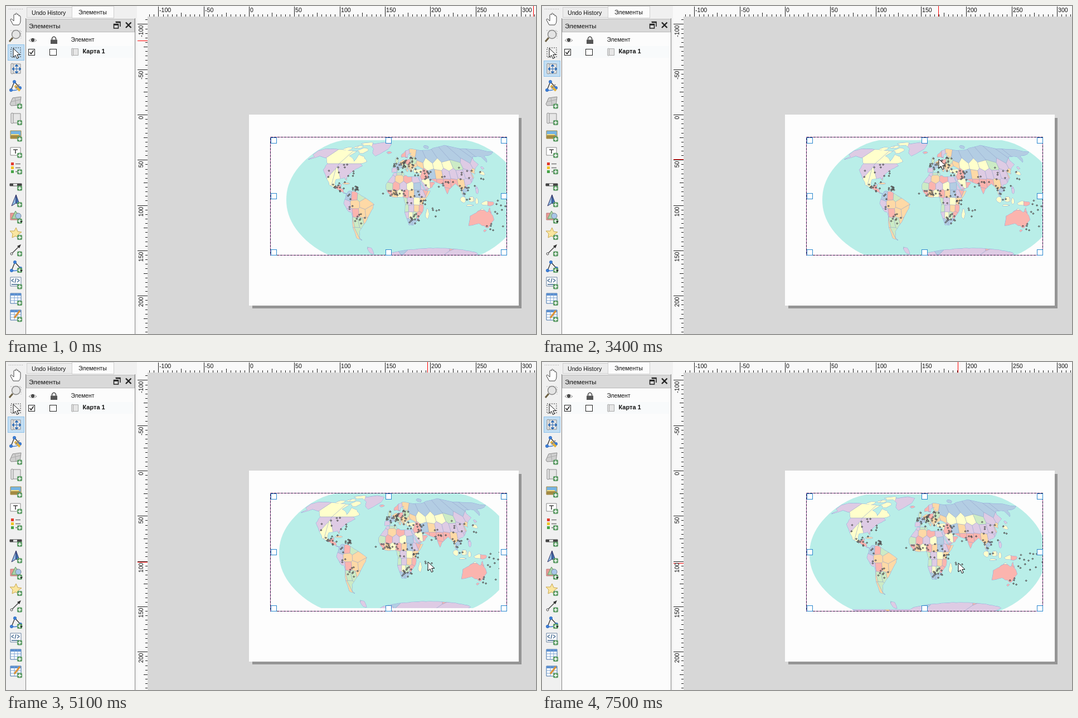
Animation, 951 px wide and 589 px high, one loop 8000 ms. Source, as an HTML page:

```html
<!DOCTYPE html>
<html lang="ru">
<head>
<meta charset="utf-8">
<title>Map layout</title>
<style>
html, body { margin: 0; width: 100%; height: 100%; overflow: hidden; background: #f0f0f0 }
svg { display: block }
text { font: 10.6px "Liberation Sans", sans-serif; fill: #111 }
.crisp { shape-rendering: crispEdges }
</style>
</head>
<body>
<svg width="951" height="589" viewBox="0 0 951 589">
<defs>
  <clipPath id="frame"><path d="M475 235H898V447H475Z"/></clipPath>
  <clipPath id="coast"></clipPath>
  <g id="plus"><rect x="-4.5" y="-4.5" width="9" height="9" rx="2" fill="#5b9a64"/><path d="M-3 0H3M0-3V3" stroke="#fff" stroke-width="1.6"/></g>
  <path id="arrow" d="M0 0V16L4 12.5L6.5 18.5L9.3 17.2L6.8 11.5H12Z" fill="#fff" stroke="#111"/>
  <g id="node" fill="none" stroke="#333" stroke-width="1.3"><path d="M-8 8L-2-7L8 4"/><path d="M-8 8Q2 10 8 4" stroke="#3b7dd8"/><g fill="#3b7dd8" stroke="#2460b0" stroke-width=".6"><circle cx="-8" cy="8" r="2.7"/><circle cx="-2" cy="-7" r="2.7"/><circle cx="8" cy="4" r="2.7"/></g></g>
  <g id="sheet" stroke="#8a8a8a"><path d="M-9-9Q-7-11-5-9H8V8H-5Q-7 10-9 8Z" fill="#e6e6e6"/><path d="M-5-9V8"/></g>
  <g id="grid"><path d="M-10-9H9V9H-10Z" fill="#fff" stroke="#3f6ea5"/><path d="M-10-9H9V-5H-10Z" fill="#5b8fd0"/><path d="M-10-1H9M-10 4H9M-3-9V9M3-9V9" stroke="#7ba2d4"/></g>
</defs>

<g class="crisp">
  <path d="M254 19H951V589H254Z" fill="#d7d7d7"/>
  <path d="M235 0H951V19H254V589H235Z" fill="#f9f9f9"/>
  <path d="M442 201H925V543H442Z" fill="#959595"/>
  <path d="M436 195H920V538H436Z" fill="#fdfdfd"/>
  <g id="ruler" stroke="#222"></g>
  <path id="marks" stroke="#f00"/>
</g>
<g id="labels"></g>

<g clip-path="url(#frame)"><g id="map" stroke-linejoin="round">
  <path id="ocean" fill="#b9eee8"/>
  <g id="shore" fill="none" stroke="#8fa6dc"></g>
  <g id="countries" clip-path="url(#coast)" stroke="#8b97c4" stroke-width=".4"></g>
  <g id="places" fill="#ccc" stroke="#161616" stroke-width=".9"></g>
</g></g>
<g class="crisp" fill="none">
  <path d="M474.500 235.500H898.500V447H474.500Z" stroke="#d565b5"/>
  <path d="M474.500 235.500H898.500V447H474.500Z" stroke="#2c1640" stroke-dasharray="4 2"/>
  <g id="handles" fill="#fff" stroke="#2b88cf"></g>
</g>

<g class="crisp">
  <path d="M37 2H118V20H37Z" fill="#ececec" stroke="#d0d0d0"/>
  <path d="M118 0H193V21H118Z" fill="#fcfcfc" stroke="#d0d0d0"/>
  <path d="M36 23H230V46H36Z" fill="#d9d9d9" stroke="#bdbdbd"/>
  <path d="M36 48H231V589H36Z" fill="#fcfcfc"/>
  <path d="M35.500 22V589M231 22V589" stroke="#858585"/>
  <path d="M37 72H229V93H37Z" fill="#f8fafb"/>
  <path d="M40 77.500H51V88.500H40ZM78 77.500H90V88.500H78Z" fill="#fff" stroke="#222"/>
</g>
<text x="46" y="16">Undo History</text>
<text x="130" y="15">Элементы</text>
<text x="41" y="40" style="font-size:11.800px">Элементы</text>
<text x="116.500" y="64" style="font-size:10.300px">Элемент</text>
<text x="137.500" y="85" style="font-weight:bold;font-size:11px">Карта 1</text>
<g fill="none" stroke="#222">
  <path d="M196.500 28.500H205V37M197 29.500H205M193.500 32.500H201.500V40H193.500ZM194 34H201" stroke-width="1.500"/>
  <path d="M215 29.500L224.500 39M224.500 29.500L215 39" stroke-width="2.400"/>
  <path d="M42.500 83L45 86L49.500 79.500" stroke-width="1.500"/>
  <path d="M41 62Q48 54 55 62Q48 67 41 62Z" stroke="#999" fill="#eee"/><circle cx="48" cy="61" r="2.500" fill="#555"/>
  <path d="M82.500 61V58Q86 52 89.500 58V61" stroke="#555" stroke-width="1.600"/><path d="M80 60.500H92V68H80Z" fill="#555" stroke="none"/>
</g>
<use href="#sheet" transform="translate(124 83) scale(.7)"/>

<g class="crisp">
  <path d="M5 5.500H31" stroke="#999" stroke-dasharray="1 2"/>
  <path id="hot" fill="#dbe8f3" stroke="#c5dcef" d="M3.500 98.500H32.500V126.500H3.500Z"/>
  <path id="active" fill="#c3def3" stroke="#8cc2ec" d="M3.500 69.500H32.500V97.500H3.500Z"/>
</g>
<g stroke-linejoin="round" fill="none">
  <path d="M13 34L8 25Q8 22 11 24L14 27V16Q15.500 13 17 16V14Q18.500 11 20 14V16Q21.500 13 23 16V18Q25 16 26 19V27Q26 31 23 34Z" fill="#fff" stroke="#444"/>
  <path d="M8 44H27V58" stroke="#aaa" stroke-dasharray="2 2"/>
  <circle cx="18" cy="51" r="7.500" fill="#e4e4e4" stroke="#888" stroke-width="1.500"/><path d="M12 57L6 64" stroke="#6d6144" stroke-width="3"/>
  <path d="M9 75H26V92H9Z" stroke="#333" stroke-dasharray="2 2"/><use href="#arrow" x="13" y="76"/>
  <use href="#sheet" x="18" y="113"/><path d="M13 113H25M19 107V119M19 105L16 108H22ZM19 121L16 118H22ZM11 113L14 110V116ZM27 113L24 110V116Z" fill="#2f6db5" stroke="#2f6db5"/>
  <use href="#node" x="17" y="143"/><path d="M16 143L25 152" stroke="#e3b13b" stroke-width="4"/><path d="M24 141L17 148" stroke="#888" stroke-width="2"/>
  <path d="M7 176L12 165L27 163L25 178L9 179Z" fill="#cfcfcf" stroke="#8c8c8c"/><path d="M9 172L26 168M16 164L18 178" stroke="#aaa"/>
  <use href="#sheet" x="18" y="202"/>
  <path d="M8 224H27V238H8Z" fill="#75b4e4" stroke="#a88b3d"/><path d="M8 233Q17 227 27 234V238H8Z" fill="#a38a43"/><path d="M9 231H23" stroke="#f2dc82" stroke-width="2"/>
  <path d="M8 254H26V268H8Z" fill="#fff" stroke="#888"/><path d="M13 258H21M17 258V265" stroke="#444" stroke-width="1.600"/>
  <path d="M9 281H14V286H9Z" fill="#e23b2e"/><path d="M9 288H14V293H9Z" fill="#f0c52a"/><path d="M9 295H14V300H9Z" fill="#47a447"/><path d="M17 283.500H26M17 290.500H26M17 297.500H21" stroke="#777" stroke-width="1.500"/>
  <path d="M7 319H28V323H7Z" fill="#fff" stroke="#444"/><path d="M7 319H13V323H7ZM20 319H28V323H20Z" fill="#444"/>
  <path d="M18 339L10 359L18 354Z" fill="#8fbbe4" stroke="#336"/><path d="M18 339L25 358L18 354Z" fill="#3d73b4" stroke="#336"/>
  <path d="M8 372H21V384H8Z" fill="#e99a96" stroke="#b77"/><path d="M17 368L26 382H10Z" fill="#a8d4aa" stroke="#679a69"/><circle cx="22" cy="377" r="5" fill="#a9c7e8" stroke="#789"/>
  <path d="M18 398L21 405L28 406L22 410L24 417L17 413L11 416L12 409L7 404L15 404Z" fill="#fae6a0" stroke="#c9a84e"/>
  <path d="M10 445L25 430" stroke="#444" stroke-width="1.500"/><circle cx="10" cy="445" r="2" fill="#fff" stroke="#444"/><path d="M27 428L20 431L24 435Z" fill="#333"/>
  <use href="#node" x="18" y="467"/>
  <path d="M8 487H27V503H8Z" fill="#fff" stroke="#66809e"/><path d="M14 490L10 493L14 496M20 490L24 493L20 496M18 489L16 497M10 500H23" stroke="#39608a" stroke-width="1.300"/>
  <use href="#grid" x="18" y="525"/><use href="#grid" x="18" y="555"/><path d="M15 560L25 547" stroke="#dc9136" stroke-width="3"/>
  <g id="badges"></g>
</g>
<use id="cursor" href="#arrow"/>
</svg>

<script>
const $ = id => document.getElementById(id);
const add = (id, markup) => $(id).insertAdjacentHTML('beforeend', markup);
let seed = 11;
const random = () => (seed = seed * 16807 % 2147483647) / 2147483647;
const spread = () => random() + random() - 1;

// Rulers: 5 mm divisions, labels every 50 mm
const division = 8.13;
function ruler(origin, first, last, horizontal) {
  for (let i = first; i <= last; i++) {
    const p = Math.round(origin + i * division) + .5, major = i % 10 === 0;
    const len = major ? 18 : i % 5 === 0 ? 7 : 4;
    add('ruler', `<path d="${horizontal ? `M${p} ${19 - len}V19` : `M${254 - len} ${p}H254`}"/>`);
    if (major) add('labels', horizontal
      ? `<text x="${p + 1.5}" y="10.5">${i * 5}</text>`
      : `<text transform="translate(246 ${p + 2}) rotate(-90)" text-anchor="end">${i * 5}</text>`);
  }
}
ruler(436, -22, 63, true);
ruler(195, -21, 48, false);

for (const x of [475, 681, 888]) for (const y of [236, 336, 437])
  if (x !== 681 || y !== 336) add('handles', `<path d="M${x}.5 ${y}.5h10v10h-10Z"/>`);
for (let i = 0; i < 14; i++) add('badges', `<use href="#plus" x="24.5" y="${180 + i * 29.45}"/>`);
for (const y of [386, 474]) add('badges', `<path d="M25 ${y}h5l-2.500 3Z" fill="#222"/>`);

// Close fit of the Robinson projection, centred on 11.5 degrees east
function project([lon, lat]) {
  const a = Math.min(1, Math.abs(lat) / 90);
  return [715 + (lon - 11.5) / 180 * 212 * (1 - .48 * a ** 2.15),
          348 - Math.sign(lat) * 107 * (1.116 * a - .116 * a ** 6.5)];
}
const shape = points => 'M' + points.map(p => project(p).map(v => v.toFixed(1)).join(' ')).join('L') + 'Z';

const rim = [];
for (let lat = -90; lat <= 90; lat += 5) { rim.push([191.5, lat]); rim.unshift([-168.5, lat]); }
$('ocean').setAttribute('d', shape(rim));

function coast(points) {
  const d = shape(points);
  add('coast', `<path d="${d}"/>`);
  add('shore', `<path d="${d}"/>`);
}
// A mainland joins a few capes and bays with a slightly ragged shore
function mainland(outline) {
  const keys = outline.split(',').map(p => p.trim().split(' ').map(Number));
  coast(keys.flatMap(([x, y], i) => {
    const [u, v] = keys[(i + 1) % keys.length];
    return [0, 1 / 3, 2 / 3].map(f => [x + (u - x) * f + (f && spread()), y + (v - y) * f + (f && spread())]);
  }));
}
function island(lon, lat, w, h) {
  coast(Array.from({ length: 10 }, (_, i) => {
    const r = 1 + .3 * spread(), a = i * Math.PI / 5;
    return [lon + w * r * Math.cos(a), lat + h * r * Math.sin(a)];
  }));
}
// North America, Greenland, South America
mainland('-166 68,-156 71,-128 70,-95 68,-86 67,-94 60,-82 55,-79 52,-77 57,-77 62,-65 59,-56 52,-66 49,-61 46,-70 42,-76 37,-81 30,-80 26,-84 30,-97 28,-97 20,-91 18,-87 21,-88 16,-83 14,-82 9,-77 8,-85 11,-95 16,-105 20,-113 30,-124 41,-123 49,-133 57,-150 60,-164 55,-158 59,-166 62');
mainland('-72 78,-40 83,-20 80,-23 71,-44 60,-52 65,-54 71');
mainland('-77 8,-72 12,-62 10,-51 4,-35 -6,-39 -14,-48 -27,-57 -36,-65 -43,-69 -52,-66 -55,-74 -52,-72 -32,-70 -18,-76 -14,-81 -5,-79 1');
// Africa, Europe, Asia, Australia
mainland('-17 15,-17 21,-10 30,-6 36,10 37,11 33,20 31,33 31,37 21,43 12,51 12,40 -3,40 -15,35 -22,32 -28,26 -34,19 -34,12 -17,13 -5,9 4,-7 4,-13 9');
mainland('-9 37,-9 43,-1 44,-4 48,8 54,12 54,21 55,23 59,29 60,22 61,25 65,18 62,16 57,11 59,6 58,6 62,14 68,25 71,46 68,46 41,33 46,28 43,22 37,14 45,18 40,16 38,10 44,3 43,0 38');
mainland('44 68,68 70,80 73,104 77,130 71,160 70,190 66,178 62,163 60,162 56,157 51,156 59,140 59,136 54,140 48,130 42,126 35,120 38,122 30,116 23,108 20,109 12,105 10,101 13,104 2,99 9,97 16,91 22,80 14,77 8,72 21,57 26,49 30,52 24,59 23,54 17,44 13,35 28,36 36,27 37,27 41,44 41');
mainland('114 -22,122 -18,130 -12,136 -15,140 -17,142 -11,146 -19,153 -27,149 -38,138 -35,131 -32,116 -35');
// Antarctica
const ice = [[191, -90], [-168, -90], [-168, -79], [-30, -79]];
for (let lon = -20; lon < 185; lon += 5) ice.push([lon, -78 + 11 * Math.sin(Math.PI * (lon + 30) / 215) ** .7 + .5 * spread()]);
coast(ice);
island(-61, -71, 5, 6);
// Arctic, Atlantic, Indian Ocean, Pacific
island(-74, 68, 10, 4); island(-110, 71, 9, 2.5); island(-78, 80, 14, 3); island(-90, 74, 9, 2); island(60, 74, 6, 2.5);
island(-19, 65, 5, 1.5); island(-2, 53.5, 3, 4.5); island(-79, 22, 5, 1); island(47, -19, 2.5, 6);
island(101, 0, 4, 4); island(111, -7.5, 5, 1); island(114, 1, 4, 4); island(122, -2, 2, 4); island(139, -5, 9, 3);
island(123, 13, 2, 5); island(138, 36, 4, 2.5); island(143, 43, 2, 2); island(146.5, -42, 2, 1.5);

// Countries: rows of colours along a parallel, each land point takes the nearest
const colors = { y: '#ffffcc', p: '#decbe4', r: '#fbb4ae', b: '#b3cde3', g: '#ccebc5', o: '#fed9a6' };
const sites = [];
function row(lat, west, east, letters) {
  const gap = (east - west) / Math.max(1, letters.length - 1);
  [...letters].forEach((c, i) => sites.push({ lon: west + i * gap, lat, fill: colors[c] }));
}
// Americas
row(75, -40, -40, 'p'); row(62, -160, -84, 'pyy'); row(36, -122, -84, 'pp'); row(24, -108, -100, 'yy');
row(21, -77, -77, 'o'); row(12, -87, -87, 'r'); row(5, -74, -56, 'brg'); row(-6, -78, -50, 'poo');
row(-18, -74, -44, 'proo'); row(-30, -74, -50, 'oggo'); row(-45, -75, -67, 'og'); row(-80, -150, 160, 'pppp');
// Africa
row(28, -10, 30, 'porp'); row(18, -12, 42, 'grpybp'); row(8, -12, 48, 'royrobpo'); row(-2, 11, 40, 'gpyo');
row(-12, 14, 38, 'gpor'); row(-21, 15, 34, 'pygr'); row(-30, 17, 31, 'bb'); row(-19, 47, 47, 'y');
// Europe
row(65, -19, -19, 'r'); row(64, 10, 26, 'rpo'); row(52, -3, 27, 'gorg'); row(45, 2, 32, 'bgoo'); row(39, -5, 35, 'pggoyy');
// Asia and Australia
row(58, 40, 170, 'bbbbbbb'); row(46.5, 36, 135, 'oyyygpp'); row(34, 44, 138, 'rboppppoy');
row(22, 46, 122, 'yrrrropp'); row(10, 44, 125, 'rrrybp'); row(-3, 100, 145, 'yyyyr'); row(-25, 133, 133, 'r');

for (const s of sites) {
  let cell = [[-60, -60], [60, -60], [60, 60], [-60, 60]].map(([x, y]) => [s.lon + x, s.lat + y]);
  for (const o of sites) if (o !== s) {
    const side = ([x, y]) => (x - (s.lon + o.lon) / 2) * (o.lon - s.lon) + (y - (s.lat + o.lat) / 2) * (o.lat - s.lat);
    cell = cell.flatMap((p, i) => {
      const q = cell[(i + 1) % cell.length], a = side(p), b = side(q), f = a / (a - b);
      const kept = a <= 0 ? [p] : [];
      if (a * b < 0) kept.push([p[0] + (q[0] - p[0]) * f, p[1] + (q[1] - p[1]) * f]);
      return kept;
    });
  }
  add('countries', `<path d="${shape(cell)}" fill="${s.fill}"/>`);
}

// Places scattered around population centres
function places(count, lon, lat, w, h) {
  while (count--) {
    const [x, y] = project([lon + w * spread(), lat + h * spread()]);
    add('places', `<path d="M${x} ${y - 1.4}l1.400 1.400l-1.400 1.400l-1.400-1.400Z"/>`);
  }
}
places(11, -92, 41, 34, 12); places(12, -90, 17, 14, 7); places(12, -64, 15, 7, 5);
places(6, -72, -3, 9, 12); places(9, -60, -22, 14, 16);
places(38, 13, 49, 24, 14); places(15, 45, 34, 20, 12);
places(18, -2, 9, 22, 7); places(16, 30, 3, 18, 18); places(14, 27, -25, 10, 10); places(5, 58, -12, 12, 16);
places(9, 78, 26, 18, 16); places(11, 115, 31, 24, 16); places(12, 106, 11, 14, 14);
places(14, 163, -8, 26, 14); places(6, 155, -37, 20, 7);

// Pointer poses: time, x, y; every move slows down towards its end
const poses = [
  [0, 956, 62], [200, 956, 62], [600, 267, 24], [1000, 17, 122], [2700, 17, 122], [3400, 712, 275],
  [3600, 727, 320], [4100, 770, 364], [4300, 770, 364], [4700, 763, 363], [5300, 756, 358],
  [5600, 756, 358], [5900, 754, 358], [6000, 754, 358], [6600, 747, 361], [8000, 747, 361]];
function pointer(t) {
  const i = poses.findIndex(pose => pose[0] > t), [t0, x0, y0] = poses[i - 1], [t1, x1, y1] = poses[i];
  const f = (t - t0) / (t1 - t0), eased = f * (2 - f);
  return [Math.round(x0 + (x1 - x0) * eased), Math.round(y0 + (y1 - y0) * eased)];
}

function draw(now) {
  const t = Math.floor(now % 8000 / 100) * 100;
  const [x, y] = pointer(t);
  $('cursor').setAttribute('transform', `translate(${x} ${y})`);

  // Ruler marks stay where the pointer last touched the canvas
  const [mx, my] = t >= 600 && t < 2900 ? [267, 24] : [Math.min(x, 947), y];
  $('marks').setAttribute('d', `M${mx - .5} 0V19M236 ${my + .5}H254`);

  const picked = t >= 2200;
  $('active').setAttribute('transform', `translate(0 ${picked ? 29 : 0})`);
  $('hot').setAttribute('visibility', t >= 1000 && !picked ? 'visible' : 'hidden');

  // The dragged picture keeps its old crop until it is redrawn
  const [dx, dy] = t < 4300 ? [0, 0] : [x - 770, y - 364];
  $('map').setAttribute('transform', `translate(${dx} ${dy})`);
  $('map').setAttribute('clip-path', t < 7500 ? 'url(#frame)' : 'none');
  requestAnimationFrame(draw);
}
requestAnimationFrame(draw);
</script>
</body>
</html>
```
